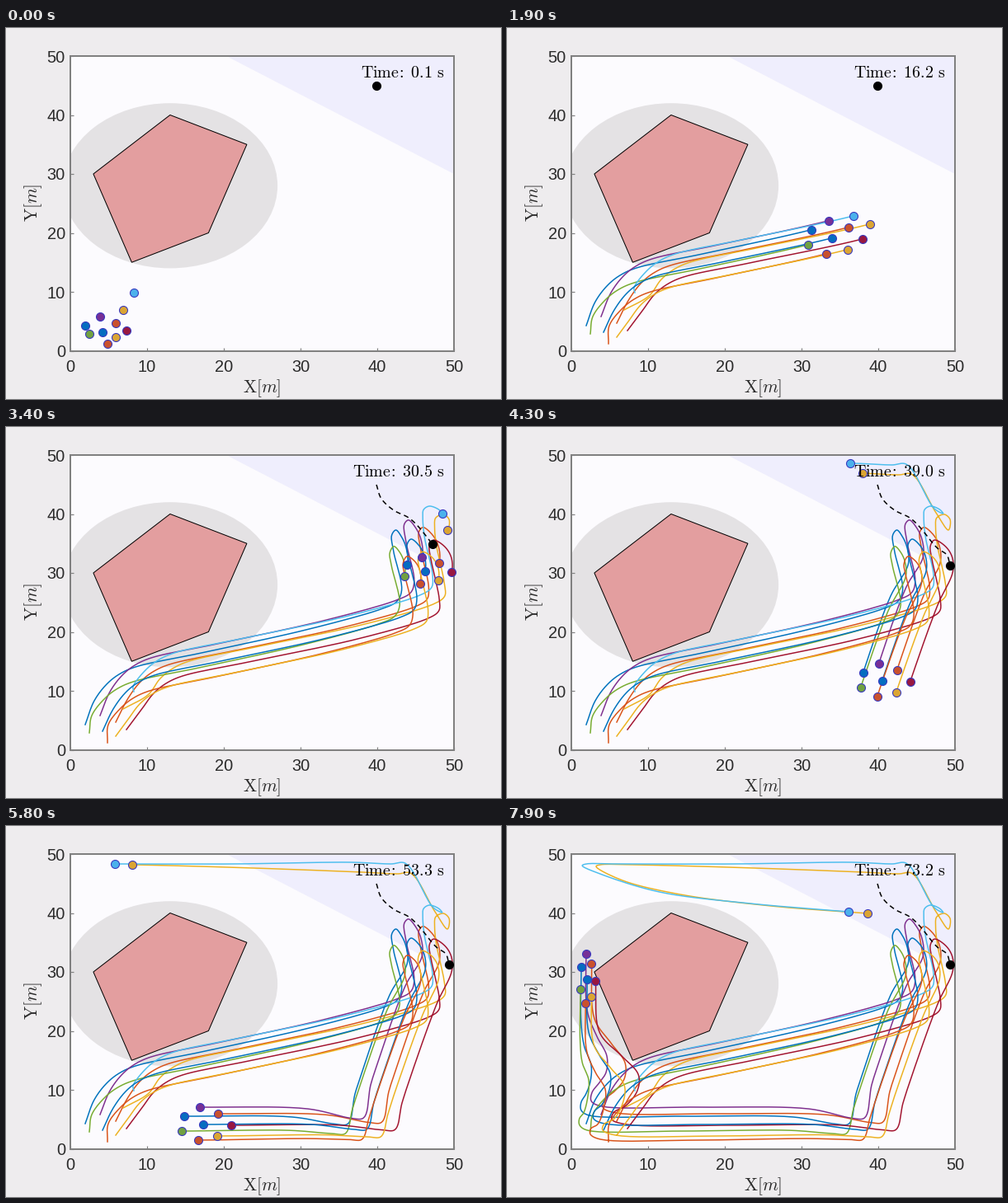
These frames come from a looping animation (600x450 px, 8000 ms). A matplotlib script:

```python
import matplotlib.pyplot as plt
import numpy as np
from matplotlib.animation import FuncAnimation
from matplotlib.colors import to_rgb
from matplotlib.patches import Circle, Polygon

W, H, DPI = 600, 450, 100
LEFT, BASE, SX, SY = 78, 391.5, 9.3, 7.15   # plot origin and pixels per metre
FRAMES, INTERVAL = 80, 100
STAGES = [0.1, 16.2, 30.5, 39.0, 53.3, 61.8, 73.25]
BLUE, ORANGE, YELLOW, PURPLE, GREEN, CYAN, MAROON = (
    "#0072BD", "#D95319", "#EDB120", "#7E2F8E", "#77AC30", "#4DBEEE", "#A2142F")
INK, FRAME = "#2b2b2b", "#808080"

plt.rcParams["font.family"] = "Liberation Sans"
plt.rcParams["mathtext.fontset"] = "cm"


def pt(px):
    return px * 72 / DPI


fig = plt.figure(figsize=(W / DPI, H / DPI), dpi=DPI, facecolor="#eeecee")
ax = fig.add_axes([LEFT / W, 1 - BASE / H, 50 * SX / W, 50 * SY / H],
                  facecolor="#fcfbfe")
ax.set(xlim=(0, 50), ylim=(0, 50), xticks=range(0, 51, 10), yticks=range(0, 51, 10))
ax.tick_params(direction="in", length=pt(4), width=pt(1.2), color=FRAME,
               labelsize=pt(20), labelcolor=INK)
ax.tick_params(axis="x", pad=pt(10.5))
ax.tick_params(axis="y", pad=pt(6))
for side in ax.spines.values():
    side.set(color=FRAME, linewidth=pt(2))


def label(x, y, text, size, **kw):
    return fig.text(x / W, 1 - y / H, text, fontsize=pt(size), **kw)


label(310, 437, r"$\mathrm{X}[m]$", 21.5, color=INK, ha="center", va="center")
label(33, 212, r"$\mathrm{Y}[m]$", 21.5, color=INK, ha="center", va="center",
      rotation=90)
clock = label(531.5, 60, "", 20, color="black", ha="right", va="baseline")

ax.add_patch(Polygon([(20.3, 50), (50, 50), (50, 30)], fc="#efeefd", lw=0, zorder=0.5))
ax.add_patch(Circle((13, 28), 14, fc="#e4e2e4", lw=0, zorder=0.6))
ax.add_patch(Polygon([(13, 40), (23, 35), (18, 20), (8, 15), (3, 30)],
                     fc="#e39e9f", ec="black", lw=pt(1), zorder=0.7))


def spline(p, sub=10):
    """Smooth curve through the points, `sub` samples per span."""
    u = np.r_[0, np.cumsum(np.sqrt(np.hypot(*np.diff(p, axis=0).T)))]
    m = np.gradient(p, u, axis=0)
    s = (np.arange(sub) / sub)[:, None]
    spans = [(2*s**3 - 3*s**2 + 1) * p[i] + (3*s**2 - 2*s**3) * p[i + 1]
             + (u[i + 1] - u[i]) * ((s**3 - 2*s**2 + s) * m[i] + (s**3 - s**2) * m[i + 1])
             for i in range(len(p) - 1)]
    return np.vstack(spans + [p[-1:]])


class Mover:
    """Follows legs of stage points, at steady speed within each leg."""

    def __init__(self, color, legs, times=STAGES, fill=None, edge="#3a3ac0", dash="-"):
        pts = np.array(sum(legs, []), float)
        self.xy = spline((pts - (LEFT, BASE)) / (SX, -SY))
        ends = 10 * (np.cumsum([len(leg) for leg in legs]) - 1)
        dist = np.r_[0, np.cumsum(np.hypot(*np.diff(self.xy, axis=0).T))]
        self.t = np.interp(dist, dist[np.r_[0, ends]], times)
        self.trail, = ax.plot([], [], color=color, lw=pt(1.5), ls=dash, zorder=2)
        self.dot, = ax.plot([], [], "o", ms=pt(10), mfc=fill or color, mec=edge,
                            mew=pt(1.1), zorder=3, clip_on=False)

    def update(self, t):
        pos = [np.interp(t, self.t, c) for c in self.xy.T]
        path = np.vstack([self.xy[self.t < t], pos])
        self.trail.set_data(*path.T)
        self.dot.set_data([pos[0]], [pos[1]])


# Group routes: x, y and how far the formation is stretched there in x and y.
APPROACH = [(130, 342, 1, 1), (145, 322, 1, 1), (160, 310, 1, 1), (180, 301, 1, 1),
            (260, 284, 1, 1), (393, 255, 1.1, 1)]
CLIMB = [(480, 230, 1, 1), (494, 222, .9, 1), (498, 208, .8, 1), (488, 160, .8, 1),
         (486, 143, .8, 1.2)]
HERD = [
    CLIMB + [(491, 136, .8, 1.1), (500, 143, .9, 1), (507, 156, .95, .9), (508, 175, .95, .8)],
    [(488, 215, 1, 1), (455, 307, 1, 1)],
    [(446, 335, 1, 1), (437, 368, 1, .65), (422, 368, 1, .65), (370, 362, 1, .9),
     (239, 362, 1, 1)],
    [(118, 361, .8, 1), (105, 355, .65, 1), (106, 346, .7, 1.1), (115, 338, .85, 1.25)],
    [(124, 320, 1, 1), (125, 300, 1, 1), (112, 278, .8, 1.1), (99, 250, .4, 1.2),
     (97, 186, .3, 1.5)],
]
PAIR = [
    [(521, 110, .7, 1), (530, 106, .8, 1), (537, 112, .6, 1.2), (535, 125, .3, 2)],
    [(520, 104, .1, .5), (490, 57, .3, 1.2), (475, 58, .4, 1.2), (432, 56, .7, 1.2)],
    [(300, 51, 1, .5), (153, 47, 1, .1)],
    [(113, 47, .8, .1), (108, 49, .8, .1), (140, 66, 1.3, .8), (210, 83, 1.2, .3)],
    [(320, 97, 1.2, .3), (437, 106, 1.1, .2)],
]


def place(keys, dx, dy):
    return [(x + sx * dx, y + sy * dy) for x, y, sx, sy in keys]


def agent(color, start, slot, pair_slot=None):
    legs = [[start] + place(APPROACH, *slot)]
    if pair_slot:
        legs += [place(leg, *pair_slot) for leg in PAIR]
        legs[1] = place(CLIMB, *slot) + legs[1]
    else:
        legs += [place(leg, *slot) for leg in HERD]
    fill = 0.9 * np.array(to_rgb(color)) + 0.1 * np.array(to_rgb("#3c3cdc"))
    return Mover(color, legs, fill=tuple(fill))


movers = [
    agent(BLUE, (96, 361), (-23, -10)),
    agent(ORANGE, (133, 358), (18, -13)),
    agent(YELLOW, (142, 342), (42, -17), (0, 0)),
    agent(PURPLE, (114, 350), (-4, -21)),
    agent(GREEN, (101, 371), (-26, 8)),
    agent(CYAN, (155, 321), (24, -27), (-21, -10)),
    agent(MAROON, (146, 367), (34, 1)),
    agent(BLUE, (117, 369), (0, 0)),
    agent(ORANGE, (123, 383), (-6, 19)),
    agent(YELLOW, (133, 375), (17, 14)),
    Mover("black",
          [[(449, 70), (455, 87), (470, 101), (488, 110), (500, 121), (517, 142)],
           [(523, 148), (533, 155), (537, 168)]],
          times=[22, 30.5, 33.5], edge="black", dash=(0, (4, 3))),
]


def draw(n):
    t = 0.1 + 0.95 * max(0, n - 2)
    for mover in movers:
        mover.update(t)
    shown = np.floor(t * 10 + 1e-6) / 10
    clock.set_text(rf"$\mathrm{{Time\!:\ {shown:.1f}\ s}}$")


anim = FuncAnimation(fig, draw, frames=FRAMES, interval=INTERVAL,
                     init_func=lambda: draw(0), repeat=True, repeat_delay=0)
plt.show()
```
